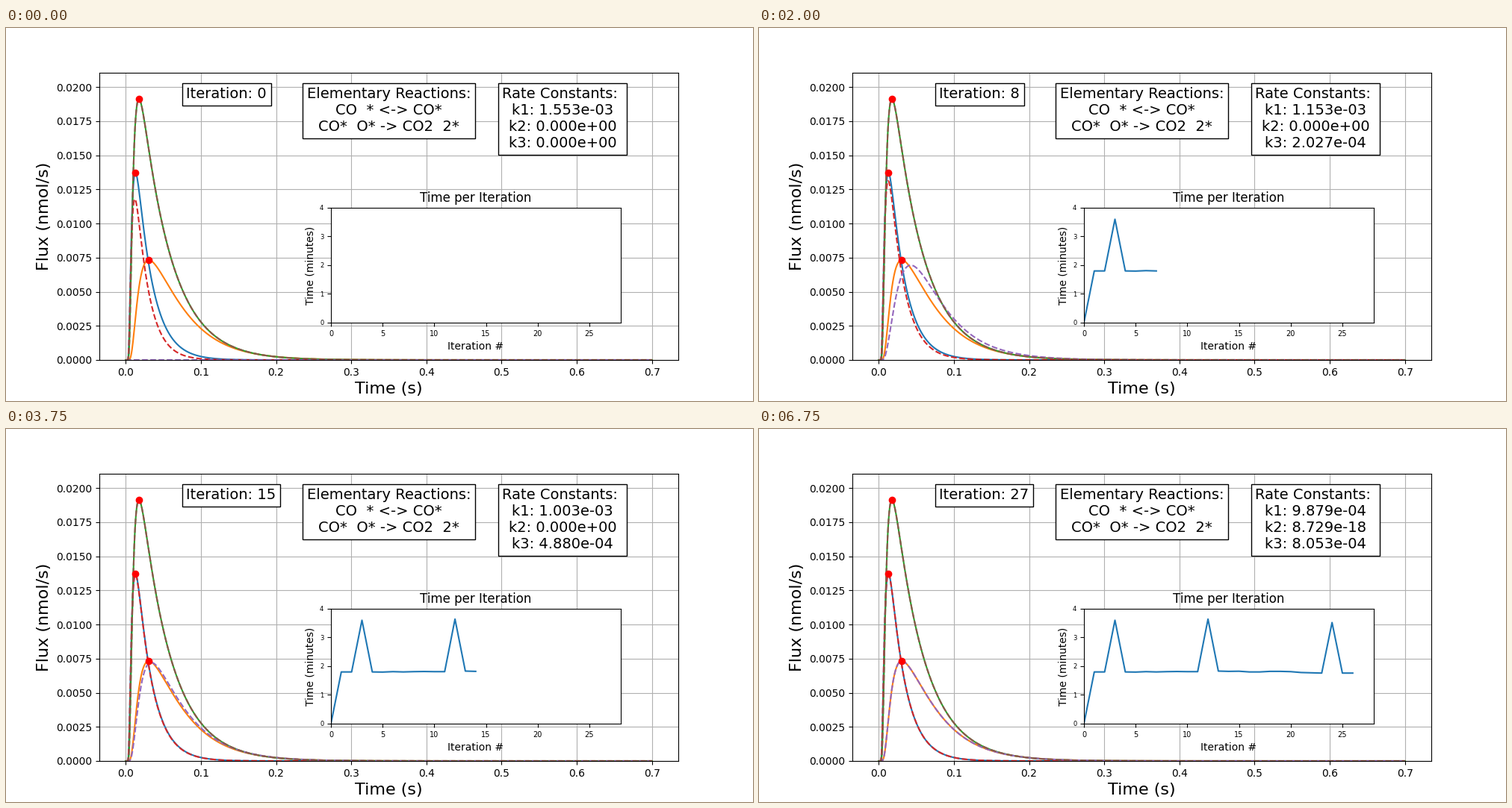
Recreate the animation shown at these times as a matplotlib script. Size 1000x500 px, loop 7 s.

```python
import numpy as np
import matplotlib.pyplot as plt
from matplotlib.animation import FuncAnimation

FRAMES, INTERVAL = 28, 250
T_END, DELAY = 0.7, 0.001

# Inverse diffusion times (1/s) of inert, CO and CO2, and uptake strengths
A_INERT, A_CO, A_CO2 = 10.05, 12.2, 9.35
CO_UPTAKE, UPTAKE_POWER = 1.72, 1.27
CO2_UPTAKE, SURFACE_RATE = 2.5, 3.9e5
PEAKS = {"CO": 0.01372, "CO2": 0.00732, "inert": 0.01913}

# Rate constants at chosen iterations, interpolated in between
KNOTS = [0, 3, 8, 11, 15, 19, 27]
K1 = [1.553e-3, 1.557e-3, 1.153e-3, 1.030e-3, 1.003e-3, 9.922e-4, 9.879e-4]
K3 = [0, 6.714e-5, 2.027e-4, 3.217e-4, 4.880e-4, 6.763e-4, 8.053e-4]
K2 = {3: 8.515e-12, 27: 8.729e-18}

MINUTES = [0, 1.80, 1.80, 3.60, 1.80, 1.795, 1.81, 1.80, 1.81, 1.815, 1.81,
           1.81, 3.64, 1.83, 1.82, 1.825, 1.80, 1.80, 1.82, 1.82, 1.81,
           1.78, 1.77, 1.76, 3.52, 1.76, 1.76]

time = np.linspace(0, T_END, 1001)


def invert(transform, nodes=24):
    """Inverse Laplace transform on the time grid (fixed Talbot contour)."""
    t = time - DELAY
    live = t > 3e-4
    t = t[live][:, None]
    r = 0.4 * nodes / t
    theta = np.arange(1, nodes) * np.pi / nodes
    cot = 1 / np.tan(theta)
    s = r * theta * (cot + 1j)
    weight = 1 + 1j * (theta + (theta * cot - 1) * cot)
    total = (np.exp(t * s) * transform(s) * weight).real.sum(axis=1)
    total += 0.5 * np.exp(0.4 * nodes) * transform(r + 0j).real[:, 0]
    flux = np.zeros_like(time)
    flux[live] = r[:, 0] / nodes * total
    return flux


def outlet(s, a, uptake):
    q = np.sqrt(s / a)
    return 1 / (np.cosh(q) + uptake * np.sinh(q) / (2 * q))


def inert_flux():
    return invert(lambda s: outlet(s, A_INERT, 0))


def co_flux(k1):
    uptake = CO_UPTAKE * (k1 / K1[-1]) ** UPTAKE_POWER
    return invert(lambda s: outlet(s, A_CO, uptake))


def co2_flux(k1, k3):
    uptake, rate = CO2_UPTAKE * k1 / K1[-1], SURFACE_RATE * k3

    def transform(s):
        q, p = np.sqrt(s / A_CO), np.sqrt(s / A_CO2)
        adsorbed = outlet(s, A_CO, uptake) * uptake * np.sinh(q / 2) / q
        return adsorbed * rate / (s + rate) * np.cosh(p / 2) / np.cosh(p)

    return invert(transform)


def constants(i):
    return np.interp(i, KNOTS, K1), K2.get(i, 0.0), np.interp(i, KNOTS, K3)


raw = {"CO": co_flux(K1[-1]), "CO2": co2_flux(K1[-1], K3[-1]),
       "inert": inert_flux()}
scale = {gas: PEAKS[gas] / raw[gas].max() for gas in raw}
measured = {gas: scale[gas] * raw[gas] for gas in raw}

fig = plt.figure(figsize=(10, 5), dpi=100)
ax = fig.add_axes([0.125, 0.11, 0.775, 0.77])
ax.grid(True)
ax.set_xlim(-0.05 * T_END, 1.05 * T_END)
ax.set_ylim(0, 1.1 * PEAKS["inert"])
ax.set_xlabel("Time (s)", fontsize=16)
ax.set_ylabel("Flux (nmol/s)", fontsize=16)

for n, flux in enumerate(measured.values()):
    ax.plot(time, flux, color=f"C{n}")
fit_co, = ax.plot([], [], "--", color="C3")
fit_co2, = ax.plot([], [], "--", color="C4")
ax.plot(time, measured["inert"], "--", color="C5")
for flux in measured.values():
    top = flux.argmax()
    ax.plot(time[top], flux[top], "o", color="red")


def boxed(x, text, ha):
    return ax.text(x, 0.95, text, transform=ax.transAxes, fontsize=14, ha=ha,
                   va="top", bbox=dict(facecolor="white", edgecolor="black"))


counter = boxed(0.15, "", "left")
boxed(0.5, "Elementary Reactions:\nCO  * <-> CO*\nCO*  O* -> CO2  2*", "center")
rates = boxed(0.8, "", "center")

inset = fig.add_axes([0.435, 0.2101, 0.3875, 0.308])
inset.set_xlim(0, 28)
inset.set_ylim(0, 4)
inset.set_yticks(range(5))
inset.tick_params(axis="x", labelsize=7)
inset.tick_params(axis="y", labelsize=6)
inset.set_title("Time per Iteration", fontsize=12)
inset.set_xlabel("Iteration #")
inset.set_ylabel("Time (minutes)")
duration, = inset.plot([], [], color="C0")


def update(i):
    k1, k2, k3 = constants(i)
    fit_co.set_data(time, scale["CO"] * co_flux(k1))
    fit_co2.set_data(time, scale["CO2"] * co2_flux(k1, k3))
    duration.set_data(range(i), MINUTES[:i])
    counter.set_text(f"Iteration: {i}")
    rates.set_text(f"Rate Constants: \nk1: {k1:.3e}\nk2: {k2:.3e}\nk3: {k3:.3e}")
    return fit_co, fit_co2, duration, counter, rates


anim = FuncAnimation(fig, update, frames=FRAMES, interval=INTERVAL,
                     init_func=lambda: update(0), repeat=True, repeat_delay=0)
plt.show()
```
